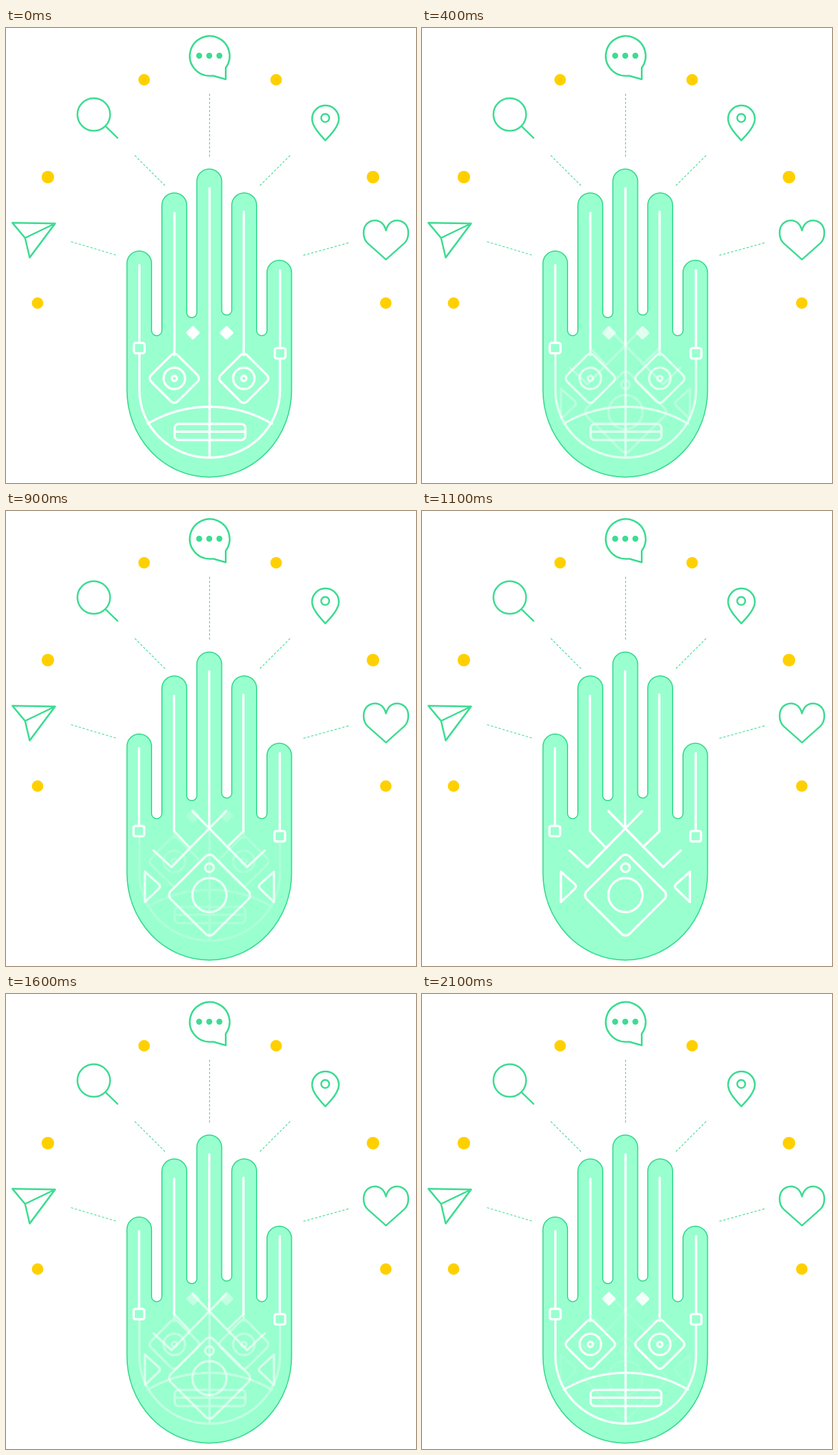
An HTML page that plays this animation: 710x789 px, repeating every 2.2 s.

```html
<!DOCTYPE html>
<html lang="en">
<head>
<meta charset="utf-8">
<title>Hand</title>
<style>
html, body { margin: 0; width: 100%; height: 100%; overflow: hidden; background: #fff; }
svg { display: block; }
.icons { fill: none; stroke: #3ddc91; stroke-width: 3; }
.rays { stroke-width: 1.3; stroke-dasharray: 4 3; stroke-linecap: butt; }
.solid { fill: #3ddc91; stroke: none; }
.hand { fill: #99ffcf; stroke: #3ddc91; stroke-width: 2; }
.lines { fill: none; stroke: #fff; stroke-width: 4; }
.white { fill: #fff; stroke: none; }
</style>
</head>
<body>
<svg width="710" height="789" viewBox="0 0 710 789" stroke-linecap="round" stroke-linejoin="round">
  <g fill="#ffd000">
    <circle cx="239.2" cy="89.7" r="10"/><circle cx="467.8" cy="89.7" r="10"/>
    <circle cx="72.5" cy="258.5" r="10.8"/><circle cx="635.5" cy="258.5" r="10.8"/>
    <circle cx="54.7" cy="477" r="10"/><circle cx="657.7" cy="477" r="10"/>
  </g>

  <g class="icons">
    <path d="M380.5 69A34.5 34.5 0 1 0 352 83H359.500L380.500 89Z"/>
    <g class="solid"><circle cx="334.500" cy="48" r="5.200"/><circle cx="352" cy="48" r="5.200"/><circle cx="369.500" cy="48" r="5.200"/></g>
    <circle cx="152" cy="150" r="28.300"/>
    <path d="M172.500 170.500L193 190.500"/>
    <path d="M553 195C545 186 530 171 530 157.500A23.200 23.200 0 0 1 576.400 157.500C576.400 171 561 186 553 195Z"/>
    <circle cx="552.800" cy="156" r="7"/>
    <path d="M658 351C655 340 648 333.700 639 333.700C627 333.700 619.300 343 619.300 355C619.300 362 621 368 626 373L658 401.500L690 373C695 368 696.700 362 696.700 355C696.700 343 689 333.700 677 333.700C668 333.700 661 340 658 351Z"/>
    <path d="M11 337.700L85 339L41 398L33 364ZM33 364L85 339"/>
    <path class="rays" d="M352.500 114V223M223 221L276 274M492 221L439 274M112.500 370.500L193 394.500M593 372.500L514 394.500"/>
  </g>

  <path class="hand" d="M209.500 408A21.200 21.200 0 0 1 252 408V524.500A9 9 0 0 0 270 524.500V307.500A21.500 21.500 0 0 1 313 307.500V494.500A8.800 8.800 0 0 0 330.500 494.500V266A21.500 21.500 0 0 1 373.500 266V490A8.800 8.800 0 0 0 391 490V307.500A21.500 21.500 0 0 1 434 307.500V524.500A9 9 0 0 0 452 524.500V424A21.200 21.200 0 0 1 494.500 424V628A142.500 150.700 0 0 1 209.500 628Z"/>

  <g class="lines" id="face">
    <path d="M291.500 555V567M411.500 555V567M352.500 549V744M231 565V628A121.700 117 0 0 0 474.500 628V574M245.500 686A212 212 0 0 1 460.500 686M292 700H414.500"/>
    <rect x="292" y="686.500" width="122.500" height="28" rx="7"/>
    <g id="eye">
      <rect x="-32.400" y="-32.400" width="64.800" height="64.800" rx="8" transform="translate(291.500 607.500) rotate(45)"/>
      <circle cx="291.500" cy="607.500" r="18.500"/><circle cx="291.500" cy="607.500" r="4.500"/>
    </g>
    <use href="#eye" x="120.300"/>
    <rect id="gem" class="white" x="-9" y="-9" width="18" height="18" rx="3" transform="translate(323.700 528.500) rotate(45)"/>
    <rect class="white" x="-9" y="-9" width="18" height="18" rx="3" transform="translate(382 528.500) rotate(45)"/>
  </g>

  <g class="lines" id="bird">
    <path d="M381 520.500L286.500 617.500L255.500 588.500M323 520.500L417.500 617.500L448 588.500M291 555L317.500 583M411.500 555L384 581.500"/>
    <rect x="-52.400" y="-52.400" width="104.800" height="104.800" rx="10" transform="translate(352.500 666) rotate(45)"/>
    <circle cx="352.300" cy="666" r="29.500"/><circle cx="352.300" cy="618.500" r="7.500"/>
    <path id="fin" d="M240.500 625.500L264.500 647Q268.500 651 264.500 655L240.500 678Z"/>
    <use href="#fin" transform="translate(704.500) scale(-1 1)"/>
  </g>

  <g class="lines" id="fingers">
    <path d="M231 411V545M291.700 320.500V555M352.500 278V549M411.700 318.500V555M474.700 420V555"/>
    <rect x="221.500" y="546" width="18.500" height="18" rx="3.500"/>
    <rect x="465.500" y="555" width="18.500" height="18" rx="3.500"/>
  </g>
</svg>
<script>
const [face, bird, fingers] = ['face', 'bird', 'fingers'].map(id => document.getElementById(id));
const start = performance.now();

// Crossfade in tenths: up until 1100 ms, a short hold, then back down.
function draw(now) {
  const step = Math.floor(Math.max(0, now - start) % 2200 / 100);
  const mix = Math.max(0, step < 12 ? step - 1 : 22 - step) / 10;
  const shown = Math.min(1, mix);
  face.setAttribute('opacity', 1 - shown);
  bird.setAttribute('opacity', shown);
  fingers.setAttribute('transform', `translate(${-0.8 * shown})`);
  requestAnimationFrame(draw);
}
draw(start);
</script>
</body>
</html>
```
